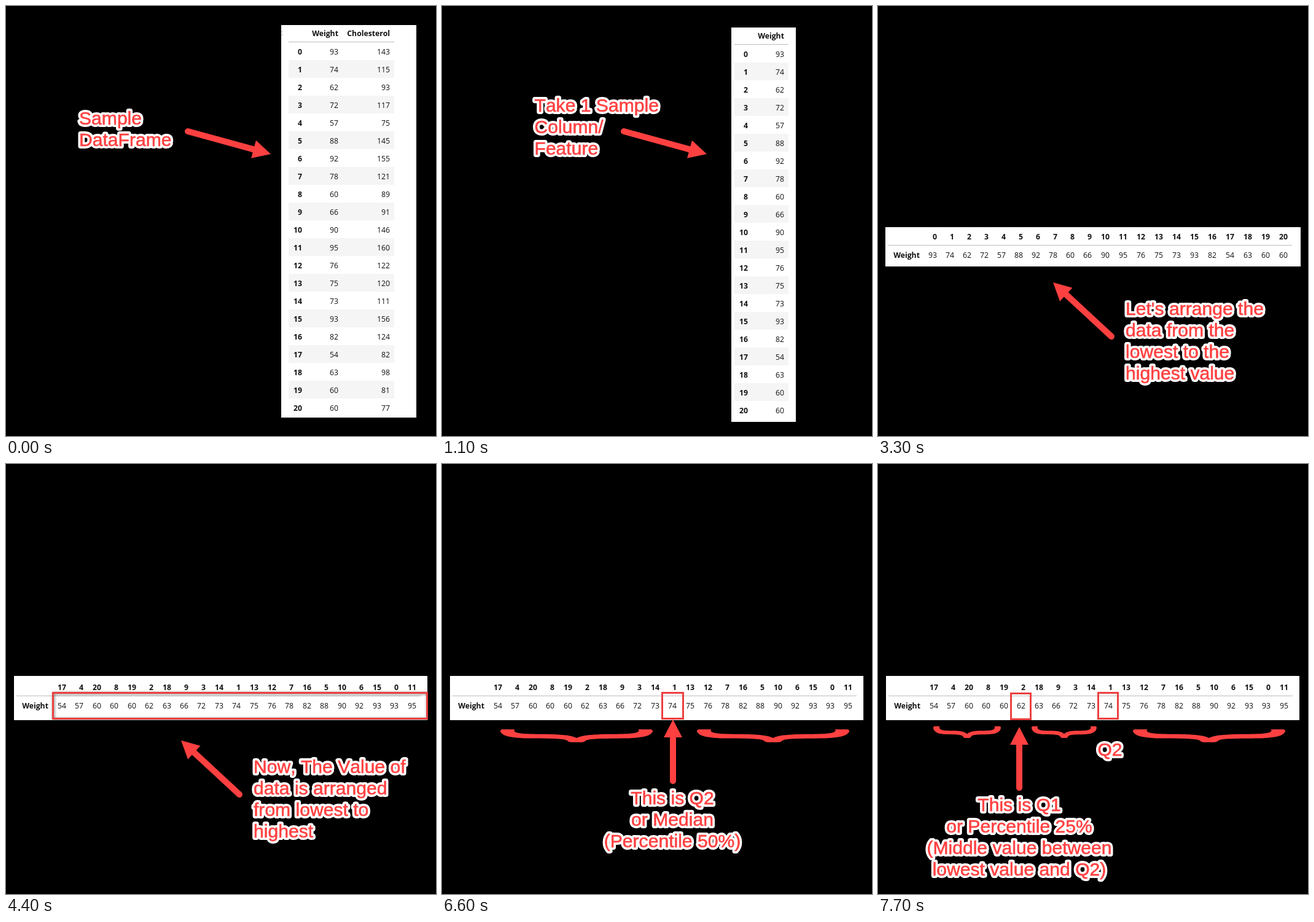
Write an HTML page that moves like this. It is 700 by 700 pixels and loops after 8000 ms.

```html
<!DOCTYPE html>
<html lang="en">
<head>
<meta charset="utf-8">
<title>Finding quartiles</title>
<style>
  html, body { margin: 0; height: 100%; overflow: hidden; background: #000; }
  svg { display: block; width: 100vw; height: 100vh; }
  .cell { font: 12.25px "Open Sans", "Noto Sans", sans-serif; fill: #111; text-anchor: end; }
  .bold { font-weight: 700; }
  .label {
    font: 30.1px "Liberation Sans", Arial, sans-serif; font-kerning: none;
    fill: #ff4040; stroke: #ff4040; stroke-width: .6px; stroke-linejoin: round;
  }
  .halo { fill: #fff; stroke: #fff; stroke-width: 8px; }
  .middle { text-anchor: middle; }
  .red { fill: #ff4040; }
  .arrow { stroke: #ff4040; stroke-width: 10px; stroke-linecap: round; }
  .box { fill: none; stroke: #ec4040; stroke-width: 3px; }
  .shadow { filter: drop-shadow(1px 1px 2px #0008); }
</style>
</head>
<body>
<svg id="stage" viewBox="0 0 700 700"></svg>
<script>
const weights = [93, 74, 62, 72, 57, 88, 92, 78, 60, 66, 90, 95, 76, 75, 73, 93, 82, 54, 63, 60, 60];
const cholesterol = [143, 115, 93, 117, 75, 145, 155, 121, 89, 91, 146, 160, 122, 120, 111, 156, 124, 82, 98, 81, 77];
const unsorted = weights.map((_, i) => i);
const sorted = [17, 4, 20, 8, 19, 2, 18, 9, 3, 14, 1, 13, 12, 7, 16, 5, 10, 6, 15, 0, 11];

const rect = (x, y, w, h, fill) => `<rect x="${x}" y="${y}" width="${w}" height="${h}" fill="${fill}"/>`;
const cell = (text, x, y, bold) => `<text class="cell${bold ? " bold" : ""}" x="${x}" y="${y}">${text}</text>`;

// Red lines over a white halo; y is the first baseline.
function label(x, y, lines, align = "") {
  const layer = style => lines.map((line, i) =>
    `<text class="label ${style} ${align}" x="${x}" y="${y + i * 35}">${line}</text>`).join("");
  return layer("halo") + layer("");
}

function arrow(x1, y1, x2, y2) {
  const length = Math.hypot(x2 - x1, y2 - y1);
  const ux = (x2 - x1) / length, uy = (y2 - y1) / length;
  const bx = x2 - 29 * ux, by = y2 - 29 * uy;
  return `<path class="arrow" d="M${x1} ${y1}L${bx} ${by}"/>` +
    `<path class="red" d="M${x2} ${y2}L${bx - 15 * uy} ${by + 15 * ux}L${bx + 15 * uy} ${by - 15 * ux}Z"/>`;
}

const box = (left, top, right, bottom, style = "") =>
  `<rect class="box ${style}" x="${left + 1.5}" y="${top + 1.5}" width="${right - left - 3}" height="${bottom - top - 3}"/>`;

// Horizontal curly brace from two mirrored halves on a unit square.
function brace(left, right, top, height) {
  const half = "M.97 0Q1 0 1 .15C.98 .45 .9 .65 .65 .69C.4 .72 .15 .68 .12 .88Q.1 1 .06 1H-.01V.67H0" +
    "C.05 .5 .15 .4 .35 .38C.6 .36 .81 .4 .82 .1L.81 0Z";
  const w = (right - left) / 2;
  return [w, -w].map(sx =>
    `<path class="red" transform="translate(${left + w} ${top}) scale(${sx} ${height})" d="${half}"/>`).join("");
}

// Vertical table; y is the top of the first data row.
function columnTable(left, right, y, indexX, columns) {
  let out = rect(left, y - 1, right - left, 1, "#bdbdbd");
  for (const { name, x } of columns) out += cell(name, x, y - 10, true);
  weights.forEach((_, i) => {
    const top = y + i * 29;
    if (i % 2) out += rect(left, top, right - left, 29, "#f5f5f5");
    out += cell(i, indexX, top + 20, true);
    for (const { values, x } of columns) out += cell(values[i], x, top + 20);
  });
  return out;
}

// Horizontal table; x is the right edge of the row heading, lineY the header rule.
function rowTable(order, x, lineY) {
  let out = rect(x - 52, lineY, 658, 1, "#bdbdbd") + cell("Weight", x, lineY + 21, true);
  for (const i of order) {
    x += i < 10 ? 28 : 29;
    out += cell(i, x, lineY - 9, true) + cell(weights[i], x, lineY + 21);
  }
  return out;
}

const randomRow = rect(12, 360, 676, 64, "#fff") + rowTable(unsorted, 68, 389);
const sortedRow = rect(13, 345, 673, 72, "#fff") + rowTable(sorted, 69, 377);
const rightBrace = brace(415, 663, 432, 21);
const medianMarks = sortedRow + box(357, 371, 394, 416) + brace(95, 343, 432, 21) + rightBrace +
  arrow(376, 516, 376, 416);

const scenes = [
  rect(448, 31, 220, 639, "#fff") +
    `<text class="cell" x="451" y="48" style="fill:#888">:</text>` +
    columnTable(460, 632, 59, 482, [
      { name: "Weight", x: 541, values: weights },
      { name: "Cholesterol", x: 625, values: cholesterol }]) +
    label(119, 192.5, ["Sample", "DataFrame"]) + arrow(296, 204, 431, 241),

  rect(471, 35, 105, 642, "#fff") +
    columnTable(476, 564, 63, 498, [{ name: "Weight", x: 557, values: weights }]) +
    label(150.5, 172, ["Take 1 Sample", "Column/", "Feature"]) + arrow(296, 204, 431, 241),

  randomRow + label(69.5, 173.5, ["The Data is", "still randomly", "arrange"]) + arrow(205, 241, 298, 328),

  randomRow + label(403, 502.5, ["Let's arrange the", "data from the", "lowest to the", "highest value"]) +
    arrow(380, 538, 285, 450),

  sortedRow + box(75, 371, 687, 416, "shadow") +
    label(403, 502.5, ["Now, The Value of", "data is arranged", "from lowest to", "highest"]) +
    arrow(380, 538, 285, 450),

  medianMarks + label(376, 557.5, ['"74" is the middle', "value of data"], "middle"),

  medianMarks + label(375, 554.3, ["This is Q2", "or Median", "(Percentile 50%)"], "middle"),

  sortedRow + box(215, 372, 250, 417) + box(357, 371, 392, 416) +
    brace(90, 200, 427, 19) + brace(250, 356, 427, 19) + rightBrace +
    label(377.5, 475, ["Q2"], "middle") + arrow(230, 527, 230, 428) +
    label(230, 564.5, ["This is Q1", "or Percentile 25%", "(Middle value between", "lowest value and Q2)"], "middle")
];

const stage = document.getElementById("stage");
stage.innerHTML = scenes.map(scene => `<g display="none">${scene}</g>`).join("");

const SCENE_MS = 1100, LOOP_MS = 8000;
const start = performance.now();
let shown = -1;

function tick() {
  const current = Math.floor(((performance.now() - start) % LOOP_MS) / SCENE_MS);
  if (current !== shown) {
    [...stage.children].forEach((group, i) => group.setAttribute("display", i === current ? "inline" : "none"));
    shown = current;
  }
  requestAnimationFrame(tick);
}
tick();
</script>
</body>
</html>
```
